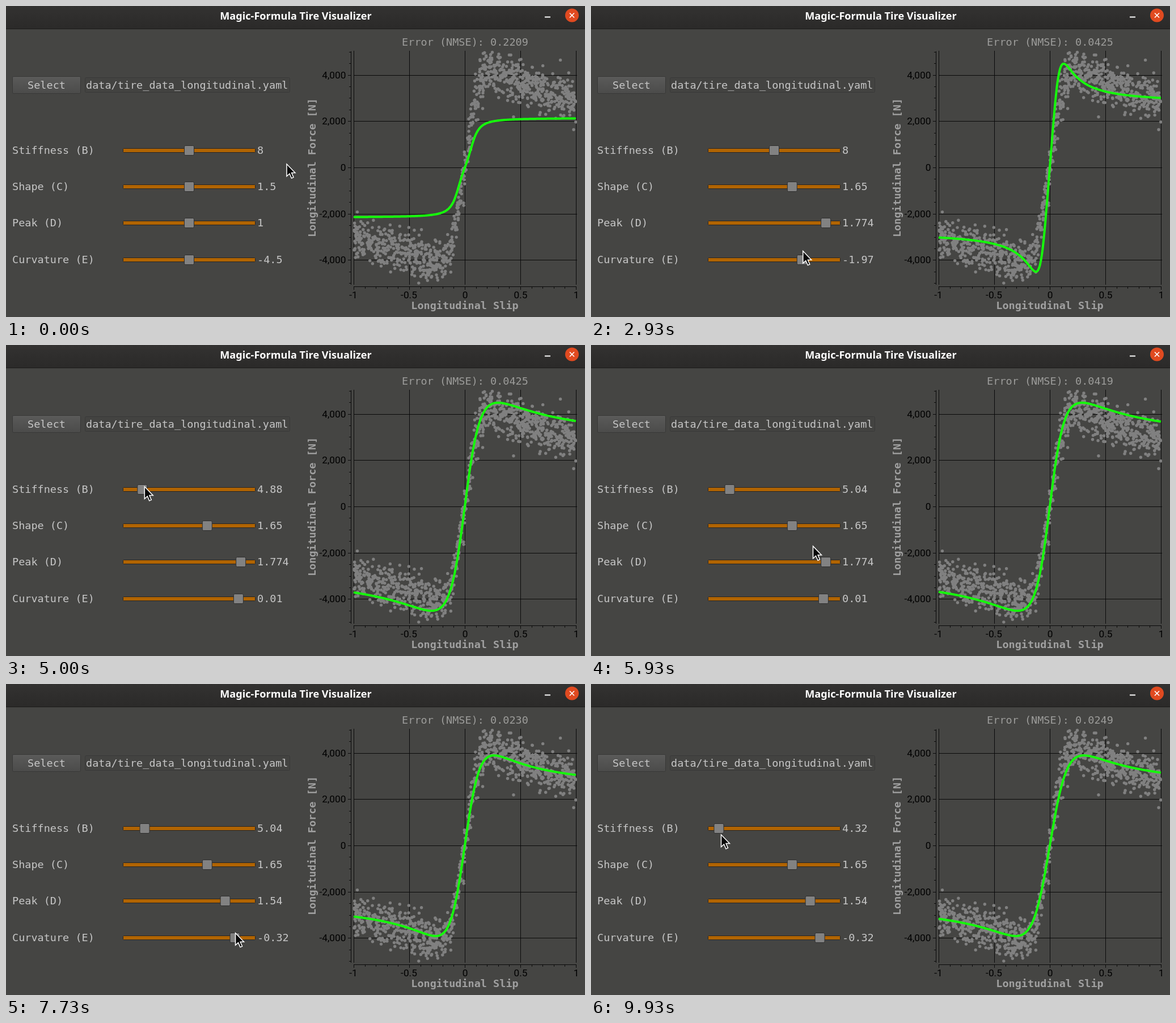
Write an HTML page that moves like this. It is 1021x549 px and loops after 9.99 s.

```html
<!DOCTYPE html>
<html lang="en">
<head>
<meta charset="utf-8">
<title>Magic-Formula Tire Visualizer</title>
<style>
  html, body { margin: 0; width: 100%; height: 100%; overflow: hidden; background: #454543; }
  svg { display: block; width: 1021px; height: 549px; }
  .ui { font: 18.5px "DejaVu Sans Mono", monospace; fill: #c6c6c6; }
  .title { font: bold 18.1px "Noto Sans", sans-serif; fill: #fff; }
  .axis { font: bold 18.5px "DejaVu Sans Mono", monospace; fill: #a0a0a0; }
  .tick { font: 17.3px Roboto, sans-serif; fill: #000; }
  .mid { text-anchor: middle; }
  .end { text-anchor: end; }
</style>
</head>
<body>
<svg viewBox="0 0 1021 549">
  <defs>
    <linearGradient id="bar" x2="0" y2="1"><stop stop-color="#333231"/><stop offset="1" stop-color="#2b2a29"/></linearGradient>
    <linearGradient id="button" x2="0" y2="1"><stop stop-color="#5b5b5a"/><stop offset="1" stop-color="#4b4b4a"/></linearGradient>
    <clipPath id="area"><rect x="610" y="79" width="397" height="413"/></clipPath>
  </defs>
  <rect width="1021" height="549" fill="#454543"/>
  <rect width="1021" height="40" fill="url(#bar)"/>
  <rect y="40" width="1021" height="1" fill="#1c1c1b"/>
  <text class="title mid" x="511" y="24">Magic-Formula Tire Visualizer</text>
  <path d="M950 19.5h10" stroke="#fff" stroke-width="2"/>
  <circle cx="998" cy="16.5" r="12" fill="#e04a20"/>
  <path d="M994 12.5l8 8m0-8l-8 8" stroke="#fff" stroke-width="1.7"/>

  <rect x="11.5" y="124.5" width="120" height="30" rx="2" fill="url(#button)" stroke="#383837"/>
  <text class="ui mid" x="71.5" y="146">Select</text>
  <rect x="139.5" y="126.5" width="361" height="26" rx="2" fill="#434341" stroke="#393938"/>
  <text class="ui" x="141" y="146">data/tire_data_longitudinal.yaml</text>
  <g id="sliders"></g>

  <text class="ui mid" id="error" x="809.5" y="69.5" style="fill:#9c9c9a"></text>
  <text class="axis mid" x="809" y="535">Longitudinal Slip</text>
  <path id="grid" stroke="#0a0a0a" fill="none" shape-rendering="crispEdges"/>
  <g id="ticks"></g>
  <text class="axis mid" transform="translate(546 285.5) rotate(-90)">Longitudinal Force [N]</text>
  <g clip-path="url(#area)">
    <path id="points" stroke="#808080" stroke-width="5.4" stroke-linecap="round" fill="none"/>
  </g>
  <path id="curve" stroke="#16fb0c" stroke-width="4" stroke-linejoin="round" fill="none"/>
  <path id="cursor" d="M0 0V21.5L5 17 8.5 25 12 23.4 8.6 15.6H15Z" fill="#080808" stroke="#fff" stroke-width="1.5"/>
</svg>
<script>
const LOOP = 9990, FPS = 15;
const X0 = 809, XS = 196, Y0 = 285.5, YS = 0.04085;
const START_ERROR = 0.2209;
const $ = id => document.getElementById(id);
const px = x => X0 + x * XS;
const py = force => Y0 - force * YS;
const handleX = steps => 323 + steps * 2.12;
const lerp = (a, b, u) => a + (b - a) * u;
const lerpPoint = (a, b, u) => a.map((v, i) => lerp(v, b[i], u));
const ease = (t, from, to) => {
  const u = Math.min(1, Math.max(0, (t - from) / (to - from)));
  return u * u * (3 - 2 * u);
};

function add(parent, tag, attrs, text = '') {
  const node = document.createElementNS('http://www.w3.org/2000/svg', tag);
  for (const key in attrs) node.setAttribute(key, attrs[key]);
  node.textContent = text;
  parent.append(node);
  return node;
}

const sliders = [
  { id: 'B', label: 'Stiffness (B)', base: 8, step: 0.08 },
  { id: 'C', label: 'Shape (C)', base: 1.5, step: 0.01 },
  { id: 'D', label: 'Peak (D)', base: 1, step: 0.018 },
  { id: 'E', label: 'Curvature (E)', base: -4.5, step: 0.11 }
];
const rowY = id => 255 + 'BCDE'.indexOf(id) * 64.2;

// Each drag moves a slider to a step count; grip is the pointer's offset from the handle.
const moves = [
  { from: 0, to: 0.01, rest: [495, 279] },
  { from: 0.4, to: 1, id: 'D', steps: 43, error: 0.0484, grip: [-1, 3] },
  { from: 1.45, to: 1.9, id: 'C', steps: 15, error: 0.0516, grip: [0, 2] },
  { from: 2.4, to: 3.4, id: 'E', steps: 41, error: 0.035, grip: [2, -15] },
  { from: 3.7, to: 4.8, id: 'B', steps: -39, error: 0.0425, grip: [4, -5] },
  { from: 5, to: 5.35, id: 'B', steps: -37, error: 0.0419, grip: [4, -5] },
  { from: 6.1, to: 6.8, id: 'D', steps: 30, error: 0.0236, grip: [-2, -13] },
  { from: 7.35, to: 7.8, id: 'E', steps: 38, error: 0.023, grip: [1, -8] },
  { from: 8.7, to: 8.75, rest: [291, 290] },
  { from: 9.1, to: 9.75, id: 'B', steps: -46, error: 0.0249, grip: [4, 11] }
];

function stateAt(t) {
  const steps = { B: 0, C: 0, D: 0, E: 0 };
  let error = START_ERROR, cursor = moves[0].rest, lastEnd = 0;
  for (const move of moves) {
    const { from, to, id, rest, grip } = move;
    const pointer = () => rest || [handleX(steps[id]) + grip[0], rowY(id) + grip[1]];
    const begin = pointer();
    if (t < from) {
      cursor = lerpPoint(cursor, begin, ease(t, lastEnd, from));
      break;
    }
    const u = ease(t, from, to);
    if (id) {
      steps[id] = Math.round(lerp(steps[id], move.steps, u));
      error = lerp(error, move.error, u);
    }
    cursor = pointer();
    lastEnd = to;
    if (t < to) break;
  }
  return { steps, error, cursor };
}

const magic = (x, b, c, e) => {
  const u = b * x;
  return Math.sin(c * Math.atan(u - e * (u - Math.atan(u))));
};

function drawSliders() {
  const group = $('sliders');
  for (const s of sliders) {
    const y = Math.round(rowY(s.id));
    add(group, 'text', { class: 'ui', x: 11, y: y + 6 }, s.label);
    add(group, 'rect', { x: 206.5, y: y - 3.5, width: 233, height: 7, rx: 1, fill: '#b16402', stroke: '#2a2622' });
    s.handle = add(group, 'rect', { y: y - 8.5, width: 17, height: 17, rx: 2, fill: '#828282', stroke: '#2e2e2e' });
    s.text = add(group, 'text', { class: 'ui', x: 443, y: y + 6 });
  }
}

function drawAxes() {
  let d = 'M608.5 79.5V491.5M613 495.5H1006';
  for (let i = -2; i <= 2; i++) {
    const x = px(i / 2) + 0.5, y = Math.floor(py(i * 2000)) + 0.5;
    d += `M${x} 79V492M613 ${y}H1007`;
    add($('ticks'), 'text', { class: 'tick mid', x: x - (i < 0 ? 1 : 0), y: 516 }, i / 2);
    add($('ticks'), 'text', { class: 'tick end', x: 599.5, y: y + 5.5 }, (i * 2000).toLocaleString('en-US'));
  }
  for (let i = -10; i <= 10; i++) {
    d += `M${px(i / 10) + 0.5} 496v${i % 5 ? 3 : 5}`;
    d += `M608 ${Math.floor(py(i * 500)) + 0.5}h${i % 4 ? -3 : -5}`;
  }
  $('grid').setAttribute('d', d);
}

function drawPoints() {
  let seed = 20177;
  const random = () => (seed = (seed * 16807) % 2147483647) / 2147483647;
  const gauss = () => Math.sqrt(-2 * Math.log(random())) * Math.cos(2 * Math.PI * random());
  let d = '';
  for (let i = 0; i < 1050; i++) {
    const x = random() * 2 - 1;
    const force = 4200 * magic(x + gauss() * 0.012, 5.3, 1.65, -0.32);
    const y = force + gauss() * (80 + 0.11 * Math.abs(force));
    if (Math.abs(y) < 5000) d += `M${px(x).toFixed(1)} ${py(y).toFixed(1)}h0`;
  }
  $('points').setAttribute('d', d);
}

function drawCurve({ B, C, D, E }) {
  // The curve turns from saturating to peaked as the shape factor rises.
  const rise = (C - 1.5) / 0.15;
  const b = B * lerp(1, 1.06, rise);
  const c = lerp(0.647 - 0.11 * (D - 1), 1.577, rise);
  let d = '';
  for (let i = -200; i <= 200; i++) {
    const x = i / 200;
    d += `${d ? 'L' : 'M'}${px(x).toFixed(1)} ${py(2534 * D * magic(x, b, c, E)).toFixed(2)}`;
  }
  $('curve').setAttribute('d', d);
}

function render(ms) {
  const { steps, error, cursor } = stateAt(Math.floor((ms + 4) * FPS / 1000) / FPS);
  const values = {};
  for (const s of sliders) {
    const n = steps[s.id];
    values[s.id] = +(s.base + n * s.step).toFixed(3);
    s.handle.setAttribute('x', handleX(n) - 8.5);
    s.text.textContent = values[s.id];
  }
  drawCurve(values);
  $('error').textContent = `Error (NMSE): ${error.toFixed(4)}`;
  $('cursor').setAttribute('transform', `translate(${cursor})`);
}

drawSliders();
drawAxes();
drawPoints();
const start = performance.now();
function tick() {
  render((performance.now() - start) % LOOP);
  requestAnimationFrame(tick);
}
tick();
</script>
</body>
</html>
```
